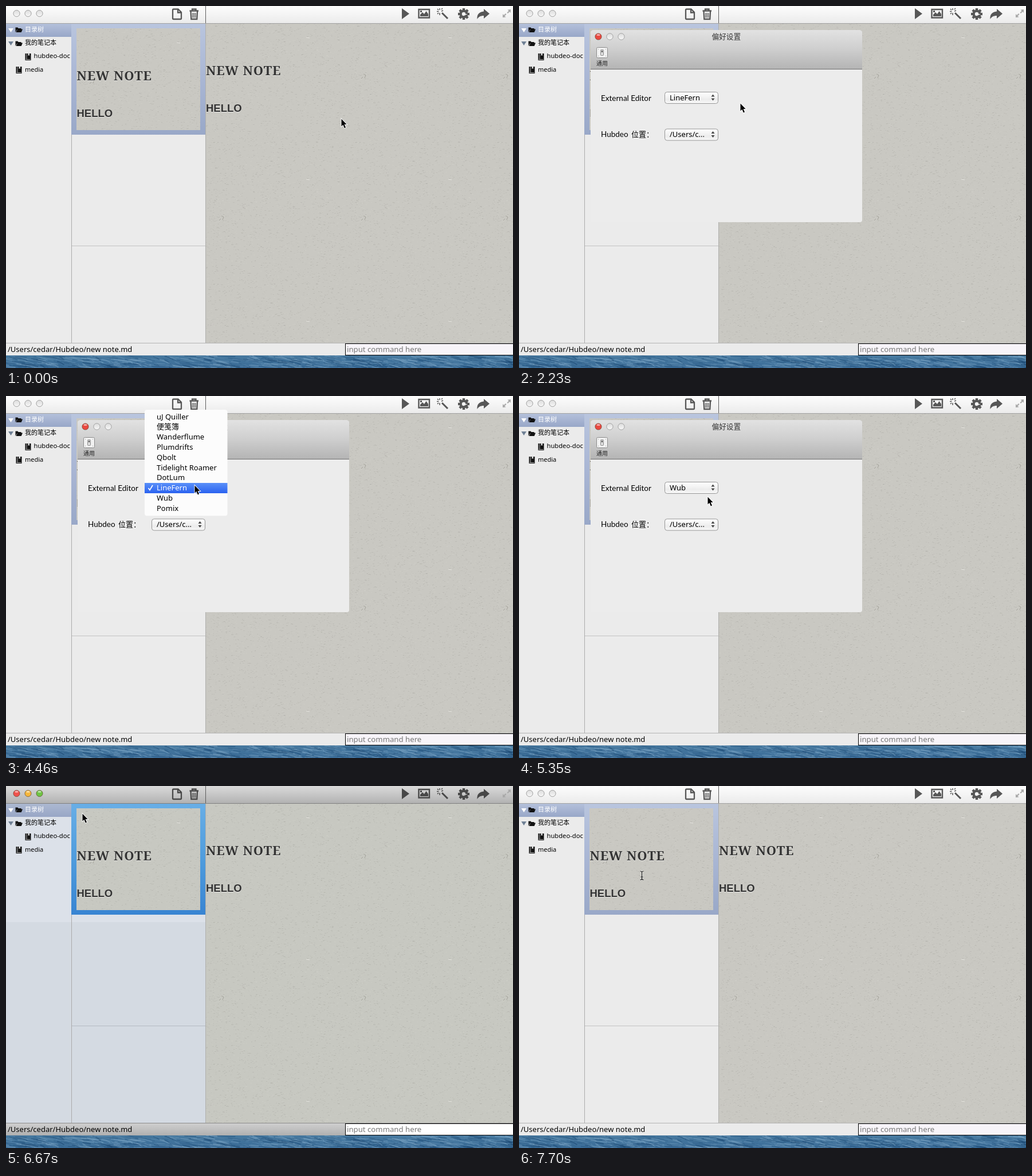
Recreate the animation shown at these times as an HTML page with a canvas. Size 885x633 px, loop 8 s.

```html
<!DOCTYPE html>
<html lang="zh">
<head>
<meta charset="utf-8">
<title>Notes preferences</title>
<style>
html, body { margin: 0; width: 100%; height: 100%; overflow: hidden; }
canvas { display: block; }
</style>
</head>
<body>
<canvas id="stage" width="885" height="633"></canvas>
<script>
const LOOP = 8000;
const stage = document.getElementById('stage').getContext('2d');
let g = stage;

const UI = '"Noto Sans", "Noto Sans CJK SC", sans-serif';
const CJK = '"Noto Sans CJK SC", "Noto Sans CJK", sans-serif';
const SERIF = '"Noto Serif", serif';
const BOLD = '"Liberation Sans", sans-serif';
const ROUND = 'Lato, sans-serif';

// ---- helpers ----
function rect(x, y, w, h, fill) {
  g.fillStyle = fill;
  g.fillRect(x, y, w, h);
}
function grad(y0, y1, ...colors) {
  const s = g.createLinearGradient(0, y0, 0, y1);
  colors.forEach((c, i) => s.addColorStop(i / (colors.length - 1), c));
  return s;
}
function round(x, y, w, h, r, fill, line) {
  g.beginPath();
  g.roundRect(x, y, w, h, r);
  g.fillStyle = fill;
  g.fill();
  if (line) { g.strokeStyle = line; g.lineWidth = 1; g.stroke(); }
}
function text(s, x, y, size, family = UI, color = '#000') {
  g.font = size + 'px ' + family;
  g.fillStyle = color;
  g.fillText(s, x, y);
}
function fill(d, color) {
  g.fillStyle = color;
  g.fill(new Path2D(d));
}
function line(d, color, width = 1) {
  g.strokeStyle = color;
  g.lineWidth = width;
  g.stroke(new Path2D(d));
}
function seeded(seed) {
  return () => (seed = (seed * 16807) % 2147483647) / 2147483647;
}
function offscreen(w, h, paint) {
  const c = document.createElement('canvas');
  c.width = w;
  c.height = h;
  g = c.getContext('2d');
  paint();
  g = stage;
  return c;
}

// ---- textures ----
function paperTile(base) {
  return offscreen(248, 248, () => {
    const rnd = seeded(4711);
    rect(0, 0, 248, 248, base);
    for (let i = 0; i < 3600; i++) {
      const tone = rnd() < .55 ? '90,88,82' : '235,234,226';
      rect(rnd() * 248 | 0, rnd() * 248 | 0, 1 + rnd() * 3 | 0, 1, `rgba(${tone},${.03 + rnd() * .09})`);
    }
    for (let i = 0; i < 80; i++) {
      const x = rnd() * 248, y = rnd() * 248;
      line(`M${x} ${y}l${1 + rnd() * 3} ${rnd() * 2 - 1}`, 'rgba(120,118,110,.28)', .8);
    }
    line('M27 89l4 2-2 5M26 94l-3 3', 'rgba(130,128,120,.5)');
    line('M175 25l6 1', 'rgba(238,237,232,.7)');
  });
}
const paperIdle = paperTile('#c9c8c2');
const paperLive = paperTile('#c7c8c1');

const sea = offscreen(885, 22, () => {
  const rnd = seeded(99);
  rect(0, 0, 885, 22, grad(0, 22, '#47799f', '#3a6c98'));
  for (let i = 0; i < 700; i++) {
    const x = rnd() * 920 - 25, y = rnd() * 24, len = 8 + rnd() * 26;
    const tone = rnd() < .45 ? '22,66,108' : '135,175,205';
    line(`M${x} ${y}q${len / 2} ${1 + rnd()} ${len} ${1 + rnd() * 6}`, `rgba(${tone},${.15 + rnd() * .35})`, .7 + rnd() * 1.3);
  }
});

function paper(x, y, w, h, live) {
  g.save();
  g.translate(x, y);
  rect(0, 0, w, h, g.createPattern(live ? paperLive : paperIdle, 'repeat'));
  g.restore();
}

// ---- window parts ----
function lights(x, y, colors) {
  colors.forEach((c, i) => {
    g.beginPath();
    g.arc(x + 20 * i, y, 5.6, 0, 7);
    g.fillStyle = c || grad(y - 6, y + 6, '#dcdcdc', '#f8f8f8');
    g.fill();
    g.strokeStyle = c ? 'rgba(70,40,20,.55)' : '#a0a0a0';
    g.lineWidth = 1;
    g.stroke();
    if (c) {
      g.beginPath();
      g.ellipse(x + 20 * i, y - 3, 3, 1.6, 0, 0, 7);
      g.fillStyle = 'rgba(255,255,255,.55)';
      g.fill();
    }
  });
}

function gear(x, y, color) {
  g.save();
  g.translate(x, y);
  g.beginPath();
  g.arc(0, 0, 7.5, 0, 7);
  g.arc(0, 0, 3.2, 0, 7, true);
  g.fillStyle = color;
  g.fill('evenodd');
  for (let i = 0; i < 8; i++) {
    g.fillRect(-2.2, -10, 4.4, 4);
    g.rotate(Math.PI / 4);
  }
  g.restore();
}

function toolbarIcons(c) {
  line('M292.5 5.5h8l5.5 5.5v10.5q0 1.5-1.5 1.5h-12q-1.5 0-1.5-1.5v-14.5q0-1.5 1.5-1.5zM300 6v5.5h5.5', c, 2.3);
  line('M320.5 8.5h15.5M325 8v-2.5h6.5v2.5M322.5 9l.8 14h10l.8-14', c, 2.3);
  line('M325.8 12v8.5M328.3 12v8.5M330.8 12v8.5', c, 1.3);
  fill('M691 4l13 9.5-13 9.5z', c);
  line('M720.5 6h18.5v14.5h-18.5z', c, 2.4);
  fill('M723 18v-3l4-4 3 3 3.5-5 3.5 5v4z', c);
  fill('M723 8h3v3h-3z', c);
  line('M761 12l10 10', c, 3);
  line('M757 4v3M757 12v4M752 9.5h3.5M760 9l3-1M753 5l2 2M762 4l-2 2M753 14l2-2', c, 1.5);
  gear(799, 14, c);
  fill('M834 5L844 13.5 834 22v-5c-6 0-9 2-11.5 6-.8-8 3.5-13 11.5-13.5z', c);
  fill('M881 6v6l-2-2-3 3-1.5-1.5 3-3-2-2zM867 20v-6l2 2 3-3 1.5 1.5-3 3 2 2z', '#a9a9a9');
}

function folder(y) {
  fill(`M16.5 ${y}v-8.5h4l1 1.5h5v2h-7z`, '#111');
  fill(`M17.5 ${y}l2.5-5.5h9l-2.3 5.5z`, '#111');
}
function book(x, y) {
  fill(`M${x} ${y}h10v12h-10z`, '#111');
  line(`M${x + 2.5} ${y}v10M${x + 1} ${y + 10.5}h8`, '#ddd', .8);
  fill(`M${x + 5} ${y}h2.5v4l-1.2-1-1.3 1z`, '#ddd');
}

function note(x, y) {
  g.shadowColor = 'rgba(255,255,255,.6)';
  g.shadowOffsetY = 1;
  g.letterSpacing = '1px';
  text('NEW NOTE', x, y, 'bold 22', SERIF, '#333');
  g.letterSpacing = '0px';
  text('HELLO', x, y + 64, 'bold 18.5', BOLD, '#333');
  g.shadowColor = 'transparent';
  g.shadowOffsetY = 0;
}

function mainWindow(live) {
  rect(0, 30, 348, 560, live ? '#d4dae2' : '#ebebeb');
  if (live) rect(0, 30, 348, 208, '#dce1e9');
  rect(0, 0, 885, 30, live ? grad(0, 30, '#dadada', '#c6c6c6', '#b2b2b2') : grad(0, 30, '#fcfcfc', '#f4f4f4', '#ebebeb'));
  lights(18.5, 13, live ? ['#f0524c', '#f6b73c', '#6fc443'] : [0, 0, 0]);
  toolbarIcons(live ? '#484848' : '#575757');
  paper(349, 30, 536, 560, live);

  // tree
  rect(0, 30, 114, 24, live ? grad(30, 54, '#adb9d1', '#98a6c6') : grad(30, 54, '#b5c1db', '#98a7c8'));
  fill('M4 39h9l-4.5 7z', '#fff');
  fill('M4 62h9l-4.5 7z', '#6f8095');
  folder(46);
  folder(70);
  book(33.5, 83);
  book(17.5, 106);
  text('目录树', 33, 44.5, 11, CJK, '#fff');
  text('我的笔记本', 33, 68, 11, CJK);
  text('media', 33, 115, 11);
  g.save();
  g.beginPath();
  g.rect(0, 70, 114, 30);
  g.clip();
  text('hubdeo-doc', 48.5, 91, 11.2);
  g.restore();

  // note list
  rect(114, 30, 1, 560, '#ababab');
  rect(348, 30, 1, 560, '#b0b0ad');
  rect(115, 419, 233, 1, live ? '#b4bac2' : '#c2c2c2');
  rect(114, 31, 234, 194, live ? grad(31, 225, '#68aee6', '#4f9cdd', '#3884d2') : grad(31, 225, '#b9c5de', '#a9b6d4', '#99a8c8'));
  paper(123, 39, 216, 178, live);
  note(123.5, 130);
  rect(0, 30, 885, 1, live ? '#808080' : '#a2a2a2');
  rect(348, 0, 1, 30, '#5c5c5c');
  note(349, 121);

  // status bar
  rect(0, 589, 885, 22, live ? grad(589, 611, '#d0d0d0', '#b0b0b0') : '#ebebeb');
  rect(0, 589, 885, 1, live ? '#8c8c8c' : '#b4b4b4');
  text('/Users/cedar/Hubdeo/new note.md', 3, 605, '500 13');
  rect(592, 590, 293, 21, '#000');
  rect(593, 591, 292, 19, live ? '#fff' : '#f7f4f9');
  text('input command here', 595, 604.5, 13.2, UI, '#777');
  g.drawImage(sea, 0, 611);
}

function popup(y, label) {
  round(254.5, y + .5, 93, 20, 4, grad(y, y + 20, '#fff', '#f6f6f6', '#ececec', '#f8f8f8'), '#979797');
  text(label, 263, y + 14.5, '500 13');
  fill(`M335.5 ${y + 8.5}l3-4 3 4zM335.5 ${y + 11.5}l3 4 3-4z`, '#444');
}

function dialog(choice, hover) {
  round(125, 43, 474, 335, 4, '#ececec');
  round(125, 42, 474, 68, [5, 5, 0, 0], grad(42, 110, '#e2e2e2', '#cecece', '#b4b4b4'));
  rect(125, 110, 474, 1, '#707070');
  lights(138.5, 53.5, ['#ea4840', 0, 0]);
  if (hover) line('M136 51l5 5m0-5l-5 5', '#6b0f0a', 1.5);
  text('偏好设置', 336.5, 58, 12.7, CJK, '#333');
  round(135.5, 72.5, 19, 18, 2, '#f2f2f2', '#8c8c8c');
  round(142.5, 76.5, 5, 10, 1, '#ddd', '#888');
  rect(144, 78, 2, 3, '#555');
  [[138, 75], [151, 75], [138, 87], [151, 87]].forEach(([x, y]) => rect(x, y, 1, 1, '#999'));
  text('通用', 135, 104, 10, CJK, '#222');
  text('External Editor', 143, 166, 13.5, ROUND);
  text('Hubdeo', 143, 229, 13.5, ROUND);
  text('位置：', 196, 229, 13, CJK);
  popup(150, choice);
  popup(214.5, '/Users/c...');
}

const editors = ['uJ Quiller', '便笺簿', 'Wanderflume', 'Plumdrifts', 'Qbolt',
  'Tidelight Roamer', 'DotLum', 'LineFern', 'Wub', 'Pomix'];
const ROW = 17.8;

function menu(picked) {
  round(242, 24, 144.5, 185.5, 4, '#fcfcfc');
  const top = Math.round(27.4 + picked * ROW);
  rect(242, top, 144.5, 18, grad(top, top + 18, '#5a90f8', '#2a62f0'));
  editors.forEach((name, i) => {
    text(name, 263, 40.5 + i * ROW, '500 13', UI, i === picked ? '#fff' : '#000');
  });
  line('M248.5 161l2.5 3.5 5-8.5', picked === 7 ? '#fff' : '#000', 1.7);
}

// ---- pointer ----
// start, end, number of jumps, destination
const moves = [
  [600, 1190, 5, 803, 12],
  [1930, 2230, 3, 386, 170],
  [2380, 2530, 2, 352, 179],
  [2680, 2830, 2, 337, 162],
  [3280, 3710, 4, 333, 160],
  [4460, 4460, 1, 329, 156],
  [4610, 4900, 3, 329, 176],
  [5500, 6080, 5, 133, 48],
  [6970, 7120, 2, 212, 154]
];
function pointerAt(t) {
  let x = 585, y = 197;
  for (const [start, end, n, toX, toY] of moves) {
    if (t < start) break;
    const gap = n > 1 ? (end - start) / (n - 1) : 1;
    const k = Math.min(1, (Math.floor((t - start) / gap + 1e-6) + 1) / n);
    const e = k * k * (3 - 2 * k);
    x += (toX - x) * e;
    y += (toY - y) * e;
  }
  return [Math.round(x), Math.round(y)];
}
function arrow(x, y) {
  g.save();
  g.translate(x, y);
  const d = 'M.5 .5v13l2.9-2.7 2.4 5.6 2.2-1-2.4-5.3h4z';
  line(d, '#fff', 1.8);
  fill(d, '#000');
  g.restore();
}
function beam(x, y) {
  const d = `M${x - 3} ${y - 7.5}q3 0 3 2v11q0 2-3 2M${x + 3} ${y - 7.5}q-3 0-3 2v11q0 2 3 2M${x - 2} ${y + 2.5}h4`;
  line(d, 'rgba(255,255,255,.6)', 2.5);
  line(d, '#111', 1.1);
}

function draw(t) {
  const [x, y] = pointerAt(t);
  mainWindow(t >= 6670 && t < 7700);
  if (t >= 1490 && t < 6670) dialog(editors[t < 5350 ? 7 : 8], t >= 6080);
  if (t >= 3280 && t < 5350) menu(y < 170 ? 7 : 8);
  if (t < 7260) arrow(x, y);
  else beam(214.5, 156.5);
}

const begin = performance.now();
function tick() {
  draw((performance.now() - begin) % LOOP);
  requestAnimationFrame(tick);
}
tick();
</script>
</body>
</html>
```
